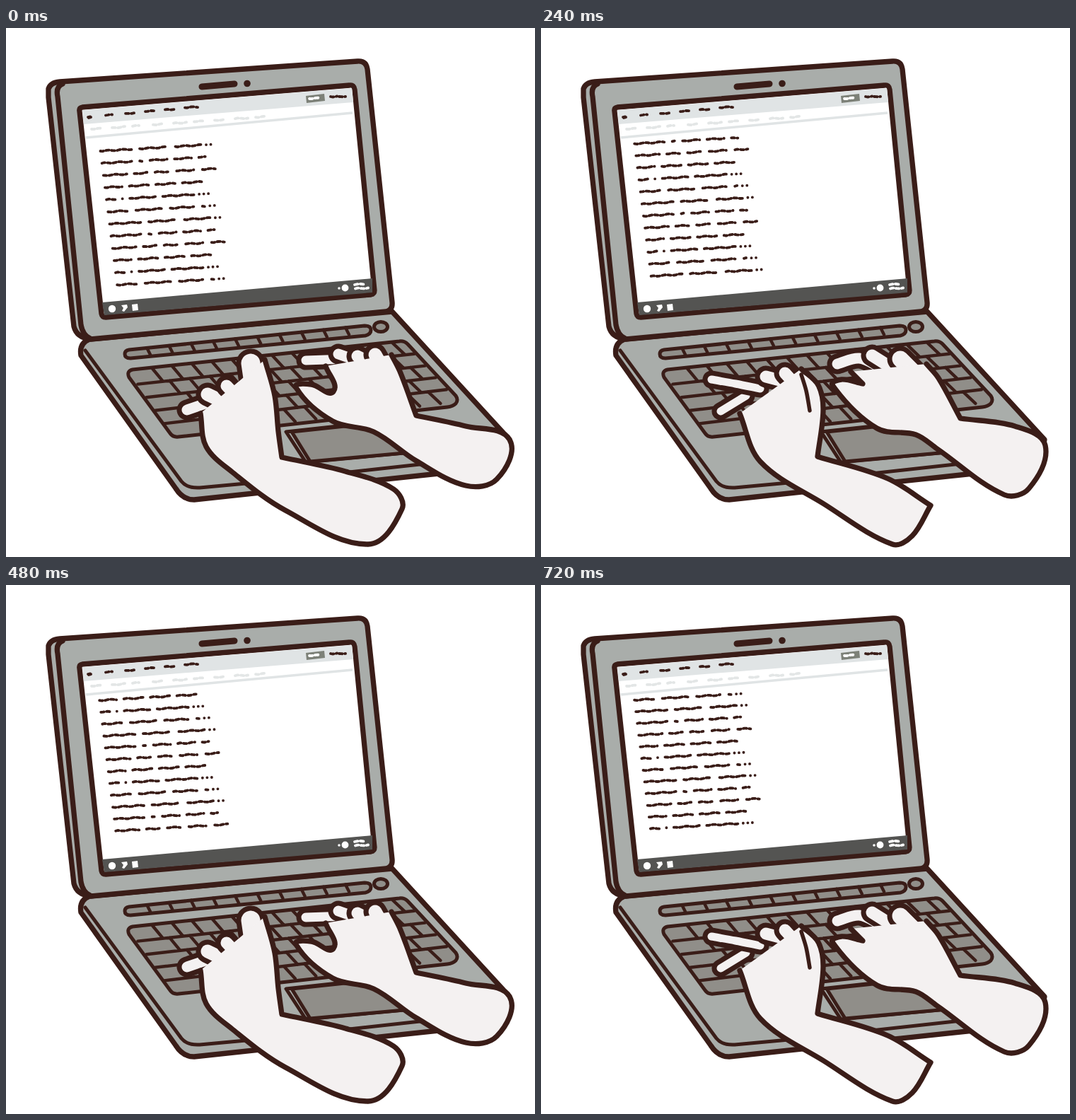
These frames come from a looping animation (748x748 px, 0.75 s). An HTML page:

```html
<!DOCTYPE html>
<html lang="en">
<head>
<meta charset="utf-8">
<title>Typing on a laptop</title>
<style>
html, body { margin: 0; width: 100%; height: 100%; overflow: hidden; background: #fff; }
svg { display: block; width: 100vw; height: 100vh; }
.ink { stroke: #3a1d18; stroke-linecap: round; stroke-linejoin: round; stroke-width: 7.3; fill: none; }
.body { fill: #a9adaa; }
.key { fill: #908e89; }
.skin { fill: #f4f1f1; }
.thin { stroke-width: 5; }
.words { fill: none; stroke: #3a1d18; stroke-width: 3.8; stroke-linecap: round; stroke-dasharray: 4.5 3.5; }
.pale { stroke: #e3e6e6; }
.white { stroke: #fff; }
</style>
</head>
<body>
<svg viewBox="0 0 748 748">
  <g class="ink">
    <path class="body" d="M118 440Q103 446 106 463L240 651Q250 667 266 667L640 627Q708 612 712 582L546 401Z"/>
    <path class="thin" d="M112 456L248 641Q256 651 274 650L350 643L640 611"/>
    <path class="body" d="M60 86Q63 77 76 76L497 47Q509 46 511 58L546 388Q547 399 537 401L120 440Q100 438 96 422L60 98Z"/>
    <path d="M80 79Q70 83 73 97L106 420Q109 435 119 439"/>
    <path fill="#fff" d="M108 112L486 81Q492 80 493 87L521 371Q521 376 516 377L141 409Q136 409 135 404L104 118Q103 113 108 112Z"/>
    <path style="stroke-width:9" d="M277 83L323 79"/>
  </g>
  <circle cx="341" cy="78.5" r="4.8" fill="#3a1d18"/>
  <path fill="#e0e4e5" d="M108 116L489 85L491 105L110 136Z"/>
  <path fill="none" stroke="#e0e4e5" stroke-width="3.5" d="M113 155L490 120"/>
  <path fill="#545452" d="M136 388L518 354L518 374L139 406Z"/>
  <path fill="#7d8178" d="M424 96L450 93L451 103L425 106Z"/>
  <g id="bars"></g>
  <g fill="#fff">
    <circle cx="150" cy="397" r="5.2"/>
    <path d="M163 392l8-1 1 4-5 6-3-1 2-4z"/>
    <path d="M178 391l8-1 1 9-8 1z"/>
    <circle cx="471" cy="368" r="1.8"/>
    <circle cx="479.5" cy="367.5" r="4.9"/>
  </g>
  <path id="text" class="words"/>
  <g class="ink thin">
    <path class="key" d="M174 455L507 421Q516 421 516 427Q516 433 508 435L176 467Q168 467 168 461Q168 456 174 455Z"/>
    <ellipse class="key" cx="530" cy="422.5" rx="9.5" ry="7"/>
    <path class="key" d="M179 483L556 443Q563 442 568 447L636 520Q640 526 636 531Q632 535 624 536L244 578Q236 579 232 573L174 494Q170 485 179 483Z"/>
    <path id="keys" style="stroke-width:4.4"/>
    <path class="body" d="M396 571L560 553L604 597L424 614Z"/>
    <path class="key" d="M404 571L555 555L596 598L430 613Z"/>
  </g>
  <g id="hands" class="ink"></g>
</svg>
<script>
const $ = id => document.getElementById(id);
const TICK = 60, LOOP = 750;
// Half lines scrolled at each tick; the hands change on every second one.
const SCROLL = [0, 0, 1, 2, 3, 4, 4, 6, 7, 8, 10, 9, 11];

// Smooth open path through "x,y" points; a repeated point makes a corner.
function curve(str) {
  const p = str.split(" ").map(s => s.split(",").map(Number));
  const at = i => p[Math.max(0, Math.min(p.length - 1, i))];
  const dir = i => {
    const a = at(i - 1), b = at(i + 1), x = b[0] - a[0], y = b[1] - a[1];
    const l = Math.hypot(x, y) || 1;
    return [x / l, y / l];
  };
  let d = "M" + p[0];
  for (let i = 0; i < p.length - 1; i++) {
    const a = at(i), b = at(i + 1), k = Math.hypot(b[0] - a[0], b[1] - a[1]) / 3;
    if (!k) continue;
    const u = dir(i), v = dir(i + 1);
    d += `C${a[0] + u[0] * k},${a[1] + u[1] * k} ${b[0] - v[0] * k},${b[1] - v[1] * k} ${b}`;
  }
  return d;
}

const line = (d, width, color) =>
  `<path d="${d}" style="stroke-width:${width};${color ? "stroke:" + color : ""}"/>`;

// A finger is a round stroke inside a wider dark one.
function finger(str) {
  const [w, ...pts] = str.split(" "), d = curve(pts.join(" "));
  return line(d, +w + 7) + line(d, w - 7, "#f4f1f1");
}

// The open arm line fills over the finger roots, so only their tips stay outlined.
const hand = (arm, fingers, crease) => fingers.map(finger).join("") +
  `<path class="skin" d="${curve(arm)}"/>` + (crease ? line(curve(crease), 5.5) : "");

const POSES = [
  hand("366,469 380,520 385,570 390,607 390,607 480,627 548,652 560,680 512,730 395,682 320,628 283,592 275,545",
    ["22 256,540 285,530", "26 285,518 310,530", "24 312,506 330,525", "34 346,474 352,515"]) +
  hand("545,462 558,488 580,548 580,548 650,563 712,582 694,638 650,647 580,612 520,571 462,556 410,508 432,504 463,514 452,478",
    ["20 424,470 480,468", "22 470,461 510,475", "24 497,464 525,478", "26 522,462 535,485"]),
  hand("358,488 382,540 382,540 388,512 399,510 390,560 391,605 391,605 490,633 557,668 557,668 530,725 505,737 400,684 296,614 276,545",
    ["20 270,560 274,535 300,518", "18 293,488 320,499 345,510", "26 345,498 355,520"]) +
  hand("556,480 572,515 580,547 580,547 708,577 714,600 690,641 660,657 590,617 518,568 455,552 412,548 440,529 457,508 449,486",
    ["22 423,474 457,461 480,480", "24 490,476 510,490", "34 525,479 535,495"]),
  hand("368,482 392,505 399,540 391,606 391,606 490,637 551,675 551,675 525,718 497,730 400,673 310,613 281,545",
    ["18 254,542 290,520", "18 241,497 275,503 310,510", "24 318,493 345,500", "24 345,488 365,510"],
    "368,490 375,513 380,541") +
  hand("545,475 562,495 593,552 593,552 670,563 713,590 690,651 655,660 560,595 530,575 475,566 412,505 425,497 455,503 455,503 438,486",
    ["22 419,475 450,467 480,480", "24 468,463 495,480", "30 508,468 530,490"]),
  hand("372,512 394,552 405,606 405,606 500,643 542,682 490,724 420,692 350,642 300,618 286,587 284,546",
    ["26 274,572 284,560 300,562", "18 242,495 275,508 310,535", "26 303,490 330,522", "26 347,500 355,520"],
    "377,529 387,553 388,574") +
  hand("563,505 578,550 578,550 680,572 717,592 700,645 650,661 570,612 535,583 480,572 415,549 415,533 455,520 445,495",
    ["22 431,478 460,484 490,505", "24 482,473 505,500", "24 512,485 530,500", "28 535,497 548,508"])
];
$("hands").innerHTML = POSES.map(p => `<g>${p}</g>`).join("");

// Key gaps on a sheared grid of five rows, plus the function strip.
function keyLines() {
  const at = (u, v) => {
    const l = 174 + 62 * v, r = 562 + 76 * v, yl = 485 + 93 * v, yr = 444 + 84 * v;
    return `${l + (r - l) * u} ${yl + (yr - yl) * u}`;
  };
  let d = "";
  for (let r = 0; r < 5; r++) {
    const v = r / 5;
    if (r) d += `M${at(0, v)}L${at(1, v)}`;
    for (let u = 0.085 + r * 0.03; u < 0.97; u += 0.073) d += `M${at(u, v)}L${at(u + 0.006, v + 0.2)}`;
  }
  for (let i = 1; i < 11; i++) d += `M${168 + i * 31.2} ${455.5 - i * 3.2}l5 10`;
  return d;
}
$("keys").setAttribute("d", keyLines());

// Slightly wavy stroke along a gently rising line.
function scribble(x, y, w) {
  let d = `M${x} ${y}`;
  for (let s = 3; s <= w; s += 3)
    d += `L${x + s} ${(y - s * 0.06 + Math.sin(s * 0.3 + x) * 0.7).toFixed(1)}`;
  return d + "l.1 0";
}

const bar = (cls, d) => `<path class="words ${cls}" d="${d}"/>`;
let menu = scribble(116, 126, 5) + scribble(117, 127, 4) + scribble(459, 97, 9) + scribble(471, 97, 9);
let tools = "";
for (let i = 0; i < 5; i++) menu += scribble(141 + i * 28, 123.5 - i * 2.7, 10 + i * 2);
for (let i = 0; i < 9; i++) tools += scribble(121 + i * 29, 143 - i * 2.1, 15 + 5 * Math.sin(i * 2));
$("bars").innerHTML = bar("", menu) + bar("pale", tools) +
  bar("white", scribble(429, 100, 15) + scribble(493, 363, 17) + scribble(494, 368.5, 18));

// Word widths of the repeating rows; 0 is a dot.
const ROWS = ["45 40 37 0 0", "43 4 24 24 10", "33 19 20 26 19",
  "24 27 27 28", "16 0 36 45 0 0 0", "29 38 35 4 0 0"];

function textRows(step) {
  const top = (step % 2 ? 164 : 174) - step * 0.12;
  const gap = 17.2 - step * 0.06;
  let d = "";
  for (let i = 0; i < 12; i++) {
    const y = top + i * gap, left = 133.5 + (y - 174) * 0.125;
    let x = 0;
    for (const word of ROWS[((step >> 1) + i) % 6].split(" ")) {
      if (x) x += +word ? 10.5 : 6.5;
      d += scribble(left + x, y - x * 0.06, +word);
      x += +word;
    }
  }
  return d;
}

const groups = [...$("hands").children];
let shown = -1;

function draw(ms) {
  const tick = Math.floor((ms % LOOP) / TICK);
  if (tick === shown) return;
  shown = tick;
  const step = SCROLL[tick], pose = ((step + 1) >> 1) % POSES.length;
  $("text").setAttribute("d", textRows(step));
  groups.forEach((g, k) => g.setAttribute("display", k === pose ? "inline" : "none"));
}

const start = performance.now();
function loop() {
  draw(performance.now() - start);
  requestAnimationFrame(loop);
}
loop();
</script>
</body>
</html>
```
